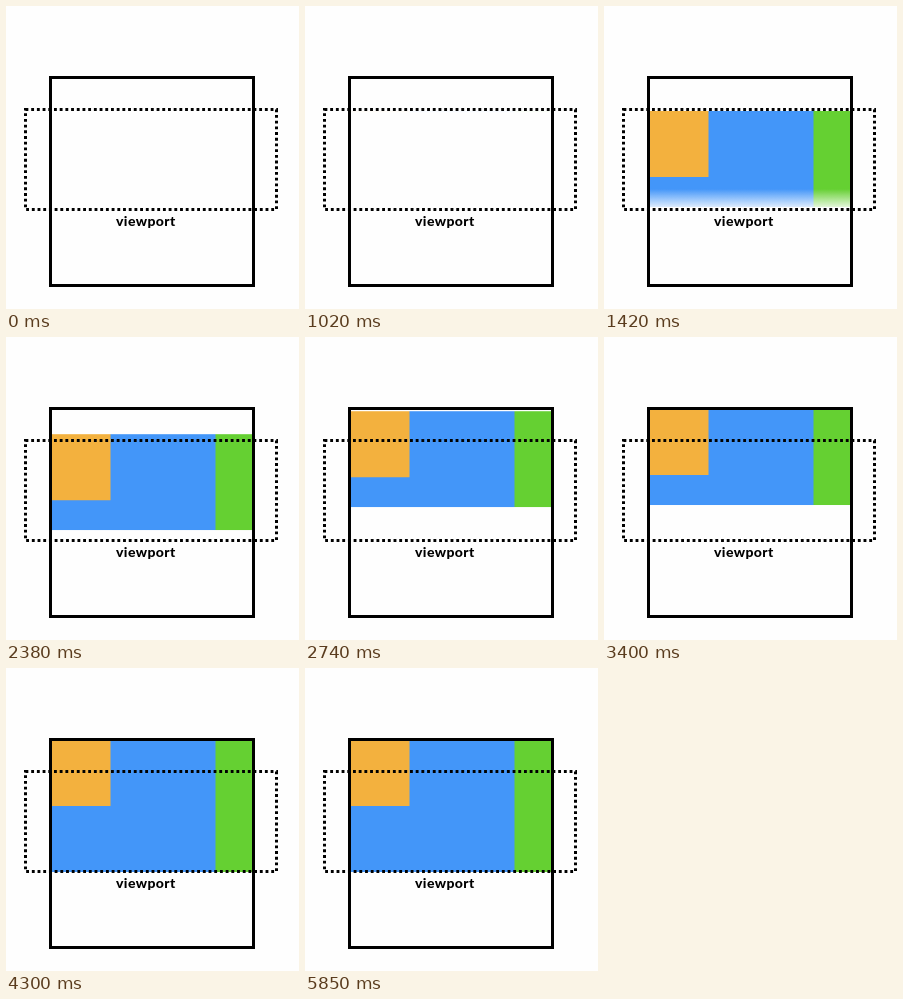
Recreate the animation shown at these times as an HTML page. Size 293 by 303 pixels, loop 6.1 s.

```html
<!DOCTYPE html>
<html lang="en">
<head>
<meta charset="utf-8">
<title>Viewport</title>
<style>
  html, body { margin: 0; width: 100%; height: 100%; overflow: hidden; background: #fefefe; }
  svg { display: block; width: 293px; height: 303px; }
  .orange { fill: #f3b13e; }
  .blue { fill: #4396f9; }
  .green { fill: #65d032; }
  .line { fill: none; stroke: #000; stroke-width: 3; }
  text { font: 800 14px Lato, sans-serif; letter-spacing: .4px; }

  .block, .cover { animation: 6100ms cubic-bezier(.37, 0, .63, 1) infinite; }
  .block { animation-name: rise; }
  .first { animation-name: reveal-first; }
  .second { animation-name: reveal-second; }

  @keyframes rise {
    0%, 35.25% { transform: translateY(33px); }
    46.9%, 100% { transform: translateY(0); }
  }
  /* Each cover has a soft 22px upper edge and slides off its part. */
  @keyframes reveal-first {
    0%, 16.1% { transform: translateY(-22px); }
    25.8%, 100% { transform: translateY(96px); }
  }
  @keyframes reveal-second {
    0%, 55.16% { transform: translateY(-22px); }
    65%, 100% { transform: translateY(36px); }
  }
</style>
</head>
<body>
<svg viewBox="0 0 293 303">
  <defs>
    <linearGradient id="soft" gradientUnits="userSpaceOnUse" x1="0" y1="0" x2="0" y2="22">
      <stop offset="0" stop-color="#fefefe" stop-opacity="0"/>
      <stop offset="1" stop-color="#fefefe"/>
    </linearGradient>
    <clipPath id="top"><rect width="202" height="96"/></clipPath>
    <clipPath id="bottom"><rect width="202" height="36"/></clipPath>
  </defs>

  <!-- The lower strip lies under the block, which starts out overlapping it. -->
  <g transform="translate(46 168)">
    <g clip-path="url(#bottom)">
      <rect class="blue" width="202" height="36"/>
      <rect class="green" x="163.5" width="38.5" height="36"/>
      <rect class="cover second" width="202" height="80" fill="url(#soft)"/>
    </g>
  </g>
  <g transform="translate(46 72)">
    <g class="block">
      <g clip-path="url(#top)">
        <rect class="blue" width="202" height="96"/>
        <rect class="orange" width="58.5" height="66"/>
        <rect class="green" x="163.5" width="38.5" height="96"/>
        <rect class="cover first" width="202" height="130" fill="url(#soft)"/>
      </g>
    </g>
  </g>

  <rect class="line" x="44.5" y="71.5" width="203" height="208"/>
  <rect class="line" x="19.5" y="103.5" width="251" height="100" stroke-dasharray="2.85"/>
  <text x="110" y="220">viewport</text>
</svg>
</body>
</html>
```
